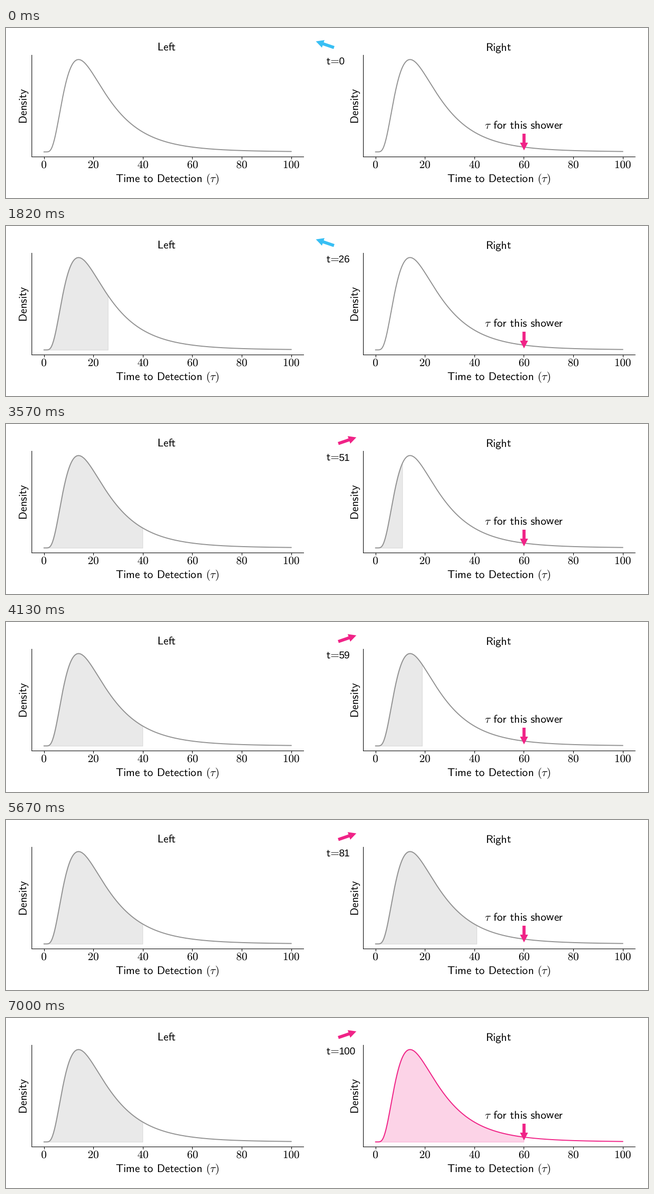
These frames come from a looping animation (1280 px wide and 341 px high, 7700 ms). A matplotlib script:

```python
import numpy as np
import matplotlib.pyplot as plt
from matplotlib.animation import FuncAnimation

W, H, DPI = 1280, 341, 128
PX = 72 / DPI  # points per pixel
GRAY, PINK, CYAN = "#929292", "#f02387", "#38bff4"
SWITCH, END, FRAMES = 40, 100, 110
EM = 22.4

plt.rcParams.update({
    "mathtext.fontset": "cm",
    "text.hinting": "none",
    "text.hinting_factor": 1,
})

fig = plt.figure(figsize=(W / DPI, H / DPI), dpi=DPI, facecolor="white")

# Log-normal density scaled to a peak of one
SIGMA, SCALE = 0.6, 20
MODE = SCALE * np.exp(-SIGMA**2)
x = np.linspace(0, 100, 500)
y = np.zeros_like(x)
y[1:] = np.exp(-np.log(x[1:] / MODE) ** 2 / (2 * SIGMA**2))


def sans(words):
    return r"\mathsf{" + words.replace(" ", r"\hspace{0.38}") + "}"


def label(px, py, tex, ha="center", **kw):
    return stage.text(px, py, f"${tex}$", ha=ha, va="baseline",
                      fontsize=EM * PX, color="black", **kw)


def arrow(tail, tip, color):
    """Block arrow between two pixel points."""
    tail, tip = np.array(tail, float), np.array(tip, float)
    along = (tip - tail) / np.hypot(*(tip - tail))
    side = np.array([-along[1], along[0]])
    neck = tip - 15.5 * along
    points = [tail + 3.1 * side, neck + 3.1 * side, neck + 8 * side, tip,
              neck - 8 * side, neck - 3.1 * side, tail - 3.1 * side]
    return stage.fill(*np.transpose(points), color=color, lw=0)[0]


class Panel:
    def __init__(self, left, title):
        width, top, bottom = 542, 54, 257.8
        self.ax = fig.add_axes([left / W, 1 - bottom / H,
                                width / W, (bottom - top) / H])
        self.ax.set(xlim=(-5, 105), ylim=(-0.05, 1.05),
                    xticks=range(0, 101, 20), yticks=[])
        self.ax.tick_params(length=4.9 * PX, width=1.1 * PX, labelbottom=False)
        self.ax.spines[["top", "right"]].set_visible(False)
        for side in ("left", "bottom"):
            self.ax.spines[side].set_linewidth(1.1 * PX)
        self.line, = self.ax.plot(x, y, color=GRAY, lw=2 * PX)
        self.area = None

        middle = left + width / 2
        label(middle - 1.7, 46, sans(title))
        label(middle - 0.7, 309, sans("Time to Detection ") + r"(\tau)")
        label(left - 9.2, 156.5, sans("Density"), rotation=90,
              rotation_mode="anchor")
        for tick in range(0, 101, 20):
            label(left + width * (tick + 5) / 110 - 0.2, 282, str(tick))

    def show(self, elapsed, color=GRAY):
        self.line.set_color(color)
        if self.area:
            self.area.remove()
            self.area = None
        if elapsed > 0:
            part = x <= elapsed
            self.area = self.ax.fill_between(x[part], y[part], color=color,
                                             alpha=0.2, lw=1.4 * PX)


# Pixel-coordinate layer for labels and arrows
stage = fig.add_axes([0, 0, 1, 1], zorder=5)
stage.set(xlim=(0, W), ylim=(H, 0), autoscale_on=False)
stage.axis("off")

left_panel = Panel(51.2, "Left")
right_panel = Panel(712.2, "Right")
label(1033, 202.5, r"\tau" + sans(" for this shower"))
arrow((1032.8, 212), (1032.8, 245.5), PINK)
look_left = arrow((654, 39.2), (617.8, 26.8), CYAN)
look_right = arrow((662.5, 39.2), (698.5, 26.8), PINK)

# The math font has no sans digits, so the count is plain text
label(637.6, 74, sans(r"t\hspace{-0.2}=\hspace{-0.2}"), ha="left")
count = stage.text(637.6 + 1.139 * EM, 74, "", family="Liberation Sans",
                   fontsize=0.9 * EM * PX, va="baseline", color="black")


def update(frame):
    t = min(frame, END)
    looking_left = t <= SWITCH
    look_left.set_visible(looking_left)
    look_right.set_visible(not looking_left)
    left_panel.show(min(t, SWITCH))
    right_panel.show(t - SWITCH, PINK if t == END else GRAY)
    count.set_text(str(t))
    return []


anim = FuncAnimation(fig, update, frames=FRAMES, init_func=lambda: update(0),
                     interval=70, repeat=True, repeat_delay=0, blit=False)
plt.show()
```
